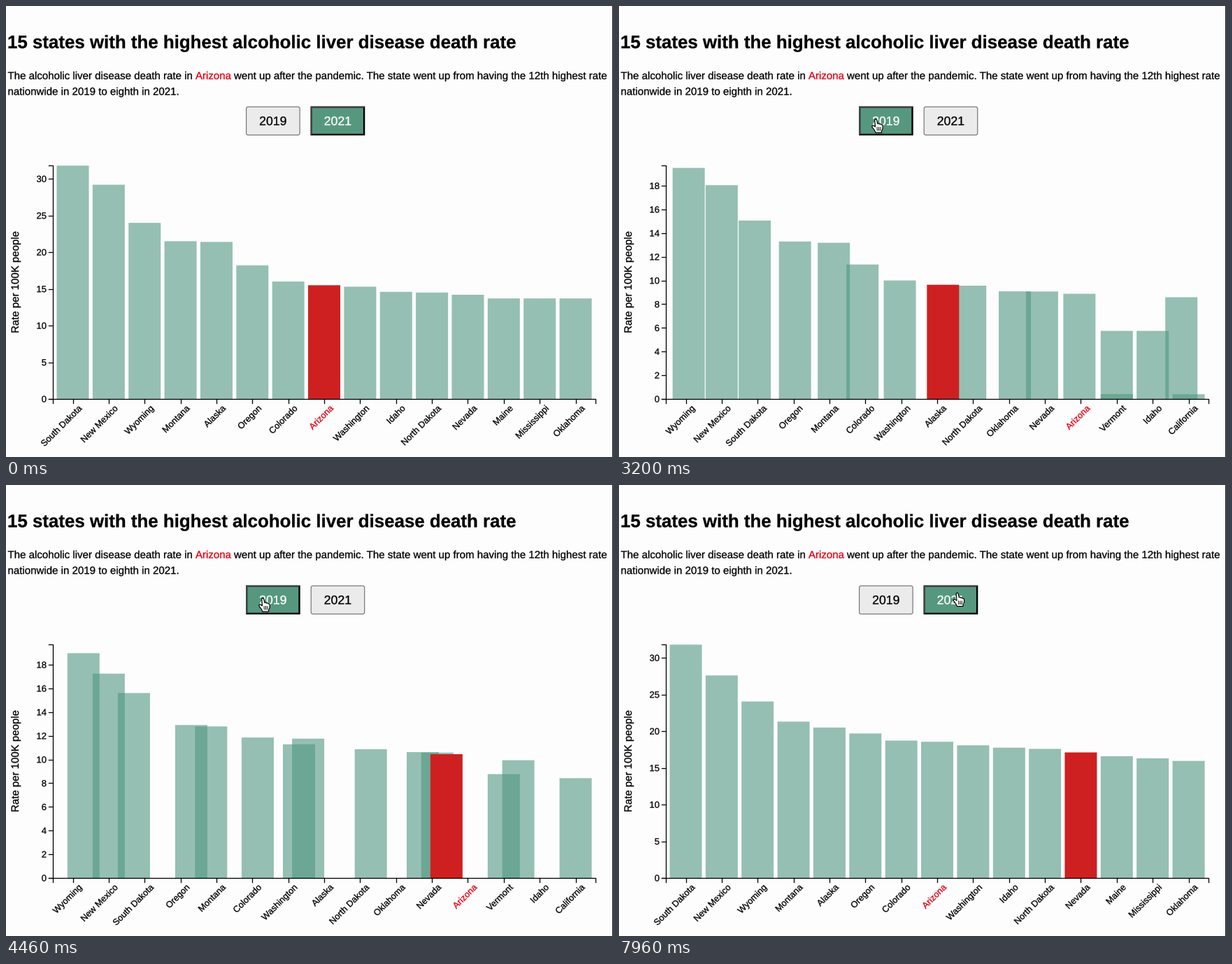
These frames come from a looping animation (868 px wide and 645 px high, 8000 ms). A matplotlib script:

```python
import numpy as np
import matplotlib.pyplot as plt
from matplotlib.animation import FuncAnimation
from matplotlib.patches import FancyBboxPatch, Polygon, Rectangle
from matplotlib.patheffects import Stroke

plt.rcParams["font.family"] = "Liberation Sans"
plt.rcParams["text.hinting"] = "none"

W, H, DPI = 868, 645, 100
LOOP, STEP = 8000, 20
PT = 72 / DPI

PAPER = "#fdfdfd"
GREEN = "#56987f"
BAR = (80 / 255, 151 / 255, 128 / 255, 0.6)
RED = "#ce2021"
HOT = "#e60012"

BASE, TOP, AXIS_X, END_X = 562, 228.3, 67.3, 842.5
BAR_X, PITCH, BAR_W = 72.5, 51.36, 46

# Two clicks on the year buttons; bars that leave move twice as fast.
CLICK_2019, CLICK_2021 = 2595, 7850
MOVE, LEAVE = 2800, 1400

RATES = {
    2021: {"South Dakota": 31.8, "New Mexico": 29.2, "Wyoming": 24.0,
           "Montana": 21.5, "Alaska": 21.4, "Oregon": 18.2, "Colorado": 16.0,
           "Arizona": 15.5, "Washington": 15.3, "Idaho": 14.6,
           "North Dakota": 14.5, "Nevada": 14.2, "Maine": 13.7,
           "Mississippi": 13.7, "Oklahoma": 13.7},
    2019: {"Wyoming": 19.7, "New Mexico": 17.1, "South Dakota": 14.9,
           "Oregon": 13.2, "Montana": 12.7, "Colorado": 12.2,
           "Washington": 11.6, "Alaska": 11.5, "North Dakota": 11.2,
           "Oklahoma": 11.0, "Nevada": 10.9, "Arizona": 10.6,
           "Vermont": 10.3, "Idaho": 10.1, "California": 9.9},
}
TICKS = {2021: range(0, 31, 5), 2019: range(0, 19, 2)}

fig = plt.figure(figsize=(W / DPI, H / DPI), dpi=DPI, facecolor=PAPER)


def stage():
    """Axes over the whole figure, in pixels from the top left."""
    ax = fig.add_axes([0, 0, 1, 1])
    ax.set_xlim(0, W)
    ax.set_ylim(H, 0)
    ax.axis("off")
    return ax


def text(ax, x, y, s, px, **kw):
    kw.setdefault("va", "baseline")
    return ax.text(x, y, s, fontsize=px * PT,
                   path_effects=[Stroke(linewidth=0.3 * PT)], **kw)


def line(ax, xs, ys, px=1.3, **kw):
    return ax.plot(xs, ys, color="black", lw=px * PT, **kw)[0]


def px_per_unit(year):
    return (BASE - TOP) / max(RATES[year].values())


def slots(year):
    """Left edge and height of each state's bar."""
    k = px_per_unit(year)
    return {s: (BAR_X + PITCH * i, v * k)
            for i, (s, v) in enumerate(RATES[year].items())}


def ease(u):
    u = min(max(u, 0), 1)
    return 4 * u ** 3 if u < 0.5 else 1 - 4 * (1 - u) ** 3


def draw_page(ax):
    """Heading, intro and axis title."""
    text(ax, 2, 60.3, "15 states with the highest alcoholic liver disease "
         "death rate", 25.87, weight="bold")
    body = 15.05
    text(ax, 2.5, 104.7, "The alcoholic liver disease death rate in", body)
    text(ax, 270.9, 104.7, "Arizona", body, color=HOT)
    text(ax, 326, 104.7, "went up after the pandemic. The state went up from "
         "having the 12th highest rate", body)
    text(ax, 2.5, 127.2, "nationwide in 2019 to eighth in 2021.", body)
    text(ax, 18, 395, "Rate per 100K people", 15, rotation=90, ha="center",
         rotation_mode="anchor")
    ax.add_patch(Rectangle((W - 1, 0), 1, H, lw=0, fc="#111111"))


def draw_scale(ax, year):
    """Ticks and labels that belong to one year."""
    k = px_per_unit(year)
    for v in TICKS[year]:
        y = BASE - v * k
        text(ax, 58, y + 4.6, str(v), 13, ha="right")
        line(ax, [61, AXIS_X], [y, y])
    for s, (x, _) in slots(year).items():
        cx = x + BAR_W / 2
        line(ax, [cx, cx], [BASE, 568])
        text(ax, cx + 14, 576, s, 12.7, ha="right", rotation=45,
             rotation_mode="anchor", color=HOT if s == "Arizona" else "black")


def backdrop(year):
    """Render everything that stays still for a year into one image."""
    ax = stage()
    draw_page(ax)
    draw_scale(ax, year)
    fig.canvas.draw()
    image = np.asarray(fig.canvas.buffer_rgba()).copy()
    ax.remove()
    return image


images = {year: backdrop(year) for year in RATES}
backs = {year: fig.figimage(im, zorder=-1) for year, im in images.items()}
ax = stage()

line(ax, [61, AXIS_X, AXIS_X, 61], [TOP, TOP, BASE, BASE], zorder=5)
line(ax, [AXIS_X, AXIS_X, END_X, END_X], [568, BASE, BASE, 568], zorder=5)

# Bars
places = {year: slots(year) for year in RATES}
bars = {}
for s in {**RATES[2021], **RATES[2019]}:
    star = s == "Arizona"
    bars[s] = ax.add_patch(Rectangle(
        (0, BASE), BAR_W, 0, lw=0, facecolor=RED if star else BAR,
        zorder=4 if star else 3, snap=False))


def place_bars(old, new, age):
    p, q = ease(age / MOVE), ease(age / LEAVE)
    a, b = places[old], places[new]
    for s, bar in bars.items():
        if s in a and s in b:
            x = a[s][0] + (b[s][0] - a[s][0]) * p
            h = a[s][1] + (b[s][1] - a[s][1]) * p
        elif s in a:
            x, h = a[s][0], a[s][1] * (1 - q)
        else:
            x, h = b[s][0], b[s][1] * p
        bar.set_bounds(x, BASE - h, BAR_W, h)


class Button:
    Y, BW, BH = 143.6, 77.7, 41.5

    def __init__(self, x, year):
        self.x, y, w, h = x, self.Y, self.BW, self.BH
        self.idle = ax.add_patch(FancyBboxPatch(
            (x + 0.6, y + 0.6), w - 1.2, h - 1.2, lw=1.2 * PT,
            boxstyle="round,pad=0,rounding_size=2.6"))
        e = 2.4
        shade = [(x, y + h), (x, y), (x + w, y), (x + w - e, y + e),
                 (x + e, y + e), (x + e, y + h - e)]
        self.active = [
            ax.add_patch(Rectangle((x, y), w, h, lw=0, fc="black")),
            ax.add_patch(Polygon(shade, lw=0, fc="#414645")),
            ax.add_patch(Rectangle((x + e, y + e), w - 2 * e, h - 2 * e,
                                   lw=0, fc=GREEN))]
        for part in self.active:
            part.set_snap(False)
        self.label = text(ax, x + w / 2, 170.4, str(year), 17.7, ha="center")

    def contains(self, x, y):
        return 0 <= x - self.x <= self.BW and 0 <= y - self.Y <= self.BH

    def show(self, on, hover):
        self.idle.set_visible(not on)
        self.idle.set_facecolor("#dedee0" if hover else "#ebebeb")
        self.idle.set_edgecolor("#555558" if hover else "#75757c")
        for part in self.active:
            part.set_visible(on)
        self.label.set_color("white" if on else "black")


buttons = {2019: Button(343, 2019), 2021: Button(435.6, 2021)}

# Mouse pointer
HAND = np.array([
    (-1.9, 1), (-0.6, -0.4), (1, 0.6), (2.3, 6.3), (3.8, 5.9), (5, 7),
    (6.6, 6.6), (7.6, 7.9), (9, 7.9), (9.7, 9.5), (9.5, 13.5), (8, 16.8),
    (8, 19), (-0.6, 19), (-2.2, 15.6), (-5.6, 11), (-5.6, 9.4), (-4, 8.8),
    (-1, 10.8)])
CREASES = np.array([
    (1.6, 11.5), (1.8, 16), (np.nan, np.nan), (4, 11.5), (4, 16),
    (np.nan, np.nan), (6.4, 11.5), (6.2, 16)])
ARROW = np.array([(0, 0), (0, 15.5), (3.6, 12.2), (6, 17.6), (8.4, 16.5),
                  (6, 11.3), (11, 11)])
hand = ax.add_patch(Polygon(HAND, fc="white", ec="black", lw=1.2 * PT,
                            joinstyle="round", zorder=9))
creases = line(ax, [], [], 1, zorder=10)
arrow = ax.add_patch(Polygon(ARROW, fc="black", ec="white", lw=1.1 * PT,
                             zorder=9))

# time, x, y of the pointer's tip
PATH = [(300, 520, 650), (1500, 365.5, 161.5), (2120, 365.5, 161.5),
        (2400, 367.5, 162), (7500, 367.5, 162), (7800, 484, 154.5),
        (LOOP, 484, 154.5)]


def pointer(t):
    for (t0, x0, y0), (t1, x1, y1) in zip(PATH, PATH[1:]):
        if t0 <= t <= t1:
            u = (t - t0) / (t1 - t0)
            u = u * u * (3 - 2 * u)
            return np.array([x0 + (x1 - x0) * u, y0 + (y1 - y0) * u])
    return np.array([PATH[0][1], H + 20])


def draw(i):
    t = i * STEP
    if t < CLICK_2019:
        year = 2021
        place_bars(2021, 2019, 0)
    elif t < CLICK_2021:
        year = 2019
        place_bars(2021, 2019, t - CLICK_2019)
    else:
        year = 2021
        place_bars(2019, 2021, t - CLICK_2021)

    tip = pointer(t)
    over = {y: b.contains(*tip) for y, b in buttons.items()}
    for y, b in buttons.items():
        b.show(y == year, over[y])
        backs[y].set_visible(y == year)

    pointing = any(over.values())
    hand.set_visible(pointing)
    creases.set_visible(pointing)
    arrow.set_visible(not pointing)
    hand.set_xy(HAND + tip)
    creases.set_data(*(CREASES + tip).T)
    arrow.set_xy(ARROW + tip)
    return []


anim = FuncAnimation(fig, draw, frames=LOOP // STEP, interval=STEP,
                     init_func=lambda: draw(0), repeat=True, repeat_delay=0,
                     blit=False)
plt.show()
```
